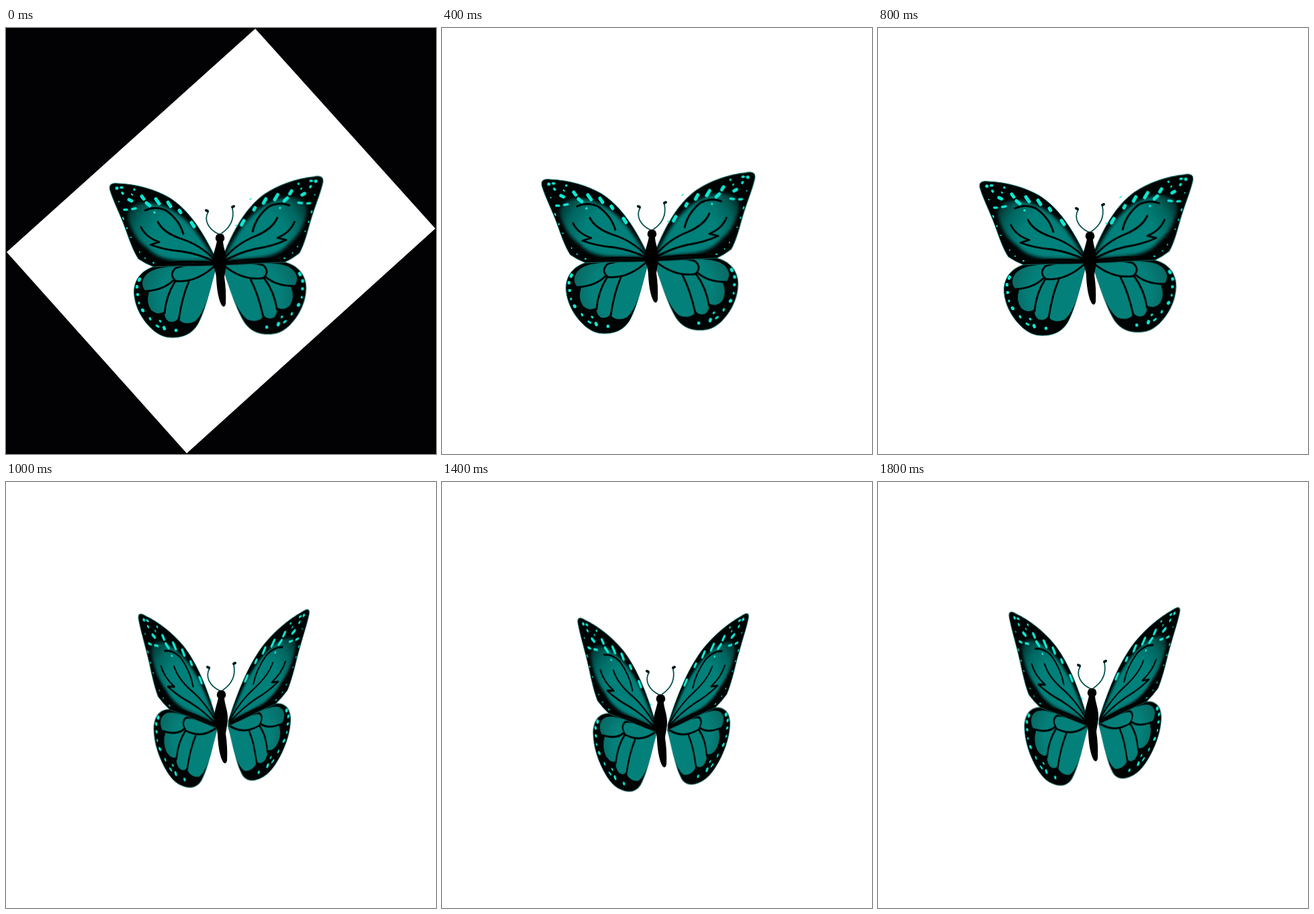
Write an HTML page that moves like this. It is 640 px wide and 633 px high and loops after 2 s.

```html
<!DOCTYPE html>
<html lang="en">
<head>
<meta charset="utf-8">
<title>Butterfly</title>
<style>
  html, body { margin: 0; width: 100%; height: 100%; overflow: hidden; background: #fff; }
  svg { display: block; width: 640px; height: 633px; }
  .backdrop, .fly, .left, .right, .open, .folded { animation: 2s step-end infinite; }
  .backdrop { animation-name: flash; }
  .fly { animation-name: drift; }
  .left, .right, .open, .folded { animation-duration: .4s; transform-origin: 0 0; }
  .left { animation-name: fold-left; }
  .right { animation-name: fold-right; }
  .open { animation-name: hide; }
  .folded { animation-name: show; }
  .ink { fill: none; stroke: #000; stroke-width: 2.8; stroke-linecap: round; stroke-linejoin: round; }
  .edge { fill: #000303; stroke: #0b7068; stroke-width: 1; }
  .spots { fill: none; stroke: #10e6d2; stroke-linecap: round; }

  @keyframes flash { 0% { visibility: visible } 10%, 100% { visibility: hidden } }
  @keyframes hide { 0% { visibility: visible } 50%, 100% { visibility: hidden } }
  @keyframes show { 0% { visibility: hidden } 50%, 100% { visibility: visible } }
  @keyframes fold-left {
    0% { transform: none }
    50%, 100% { transform: matrix(.76, .32, -.03, .99, 85, -87.6) }
  }
  @keyframes fold-right {
    0% { transform: none }
    50%, 100% { transform: matrix(.755, -.31, -.055, .97, 105.6, 116.4) }
  }
  @keyframes drift {
    0% { transform: translate(0, 0) }
    10% { transform: translate(-3px, -3px) }
    20% { transform: translate(-6px, -6px) }
    30% { transform: translate(-7px, -8px) }
    40% { transform: translate(-3px, -3px) }
    50% { transform: translate(2px, 4px) }
    60% { transform: translate(4px, 6px) }
    70% { transform: translate(7px, 10px) }
    80% { transform: translate(7px, 8px) }
    90%, 100% { transform: translate(0, 1px) }
  }
</style>
</head>
<body>
<svg viewBox="0 0 640 633">
  <defs>
    <radialGradient id="glow" gradientUnits="userSpaceOnUse" cx="262" cy="318" r="102">
      <stop offset=".45" stop-color="#04807a"/>
      <stop offset=".7" stop-color="#056660"/>
      <stop offset="1" stop-color="#001918"/>
    </radialGradient>
    <radialGradient id="lower" gradientUnits="userSpaceOnUse" cx="275" cy="395" r="82">
      <stop offset=".55" stop-color="#04807a"/>
      <stop offset="1" stop-color="#0a625d"/>
    </radialGradient>
    <filter id="soft"><feGaussianBlur stdDeviation="2.5"/></filter>

    <g id="wing">
      <!-- hind wing -->
      <path class="edge" d="M314 351C290 347 244 348 222 354C201 360 191 374 190.500 392C191 413 202 434 219 449C229 457 237 460 248 460C264 460 277 454 285 441C297 420 304 385 314 351Z"/>
      <path fill="url(#lower)" d="M312 356C303 395 295 424 281 436Q270 441 262 437Q257 434 257 430Q252 439 242 436Q235 431 236 421Q226 428 216 419Q208 408 213 392Q203 391 203 378Q206 362 228 357Q270 350 312 354Z"/>
      <path class="ink" d="M209 391Q235 389 249 375M236 424Q238 398 252 376M257 434Q262 400 272 377M311 351Q270 350 252 357Q242 367 253 376Q283 379 311 353"/>
      <!-- fore wing -->
      <path class="edge" d="M154.500 240C153 232 158 230 167 231C195 232 222 240 243 252C272 270 293 302 313 344L313 353C284 355 250 353 220 355Q207 350 197 343C189 331 183 313 178 299C171 279 159 256 154.500 240Z"/>
      <path fill="url(#glow)" filter="url(#soft)" d="M310 345C298 322 280 296 262 281C241 264 219 257 199 260C181 265 178 276 184 291C190 306 198 319 211 327Q224 342 250 345Q282 347 310 345Z"/>
      <path class="ink" d="M207 271Q222 264 238 271Q258 285 264 306M226 288Q234 304 260 313Q289 322 310 344M201 296Q208 311 228 318L215 322Q236 330 262 332Q288 336 310 347"/>
      <path class="ink" d="M311 349Q265 344 218 352"/>
      <g class="spots">
        <path stroke-width="5" d="M202 250l3 4M209 260l5 4M223 254l5 7M241 259l4 6M258 271l2 3M276 289l4 6M183 255l4 2M165 238h.1"/>
        <path stroke-width="3.600" d="M171 237l2 0M191 240v.1M173 245l1 1M176 270l4 0M188 269l5-1M221 274h.1"/>
        <path stroke-width="2.200" d="M187 247l1 1M168 258v.1M174 282l1 2M180 297v1M186 311v.1M199 333v.1M207 342v.1M219 349h1"/>
        <path stroke-width="4.600" d="M198 375l1-2M195 384v1M196 396v.1M203 419l1 1M235 445l1 2M253 449v.5"/>
        <path stroke-width="3" d="M198 408v1M214 431l1 2M229 435l1 1M224 442l3 2"/>
      </g>
    </g>
  </defs>

  <g class="backdrop">
    <rect width="640" height="633" fill="#020103"/>
    <path fill="#fff" d="M371 1L639 298L269 632L1 333Z"/>
  </g>

  <g class="fly">
    <g class="left"><use href="#wing"/></g>
    <g class="right">
      <use href="#wing" transform="translate(317 345) rotate(-2) scale(-1 1) rotate(2) translate(-317 -345)"/>
    </g>
    <g class="spots" stroke-width="1.400">
      <path class="open" d="M363 255l2-2M342 293l2 1"/>
      <path class="folded" d="M302 318l2 4"/>
    </g>
    <g fill="none" stroke="#06514e" stroke-width="1.800" stroke-linecap="round">
      <path d="M316 306C301 299 294 285 301 273M321 305C334 296 340 283 337 268"/>
      <path stroke="#011c1b" stroke-width="4" d="M298 271l2 1M337 266l2-1"/>
    </g>
    <circle cx="318.500" cy="312" r="6.800"/>
    <path d="M314 316C313 325 306 339 308 352C311 360 313 366 313 373C314 392 317 405 321 412Q325 417 327 410Q328 390 325 370C326 362 328 356 328 346C328 335 323 325 323 316Z"/>
  </g>
</svg>
</body>
</html>
```
